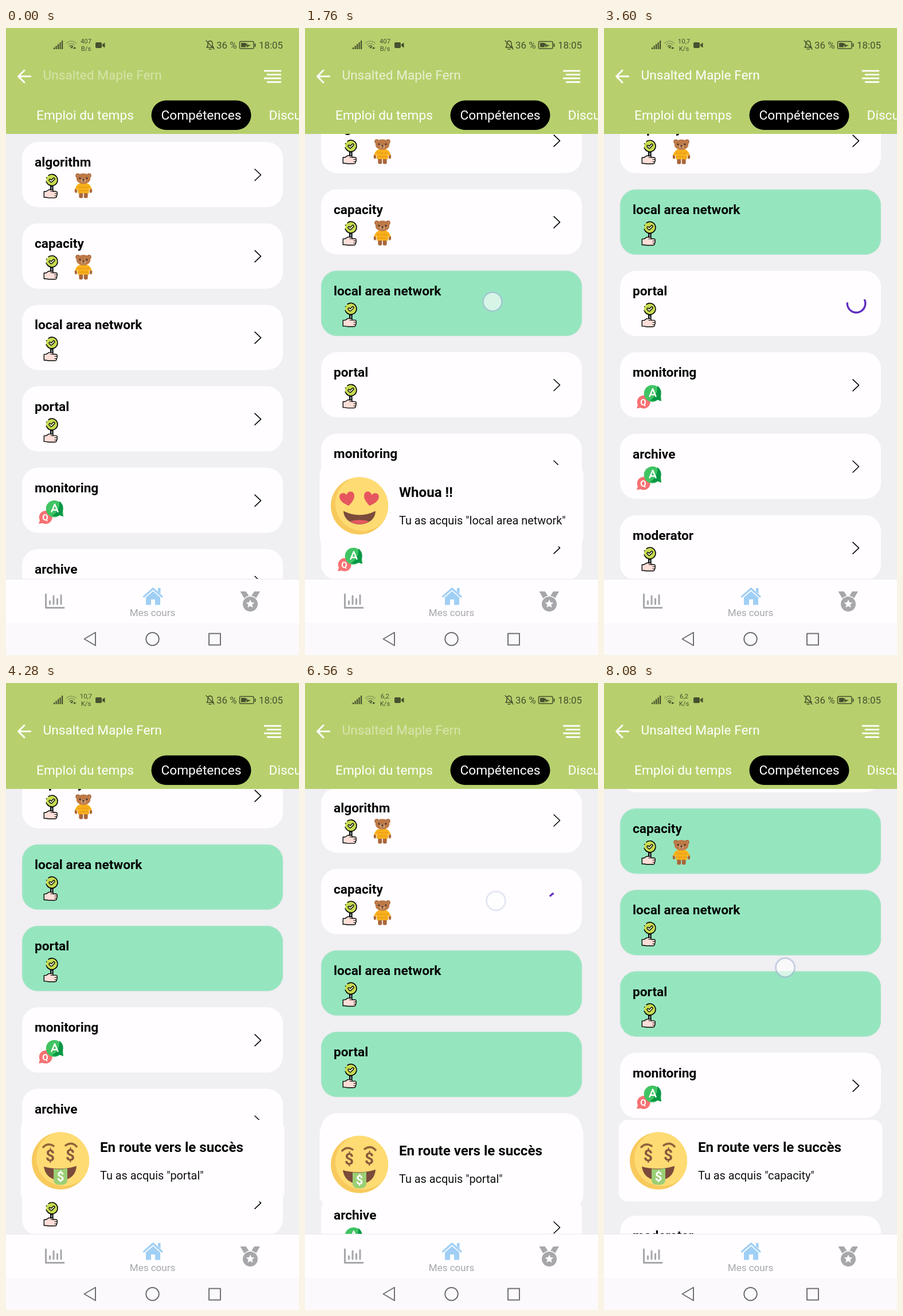
Write an HTML page with a canvas that moves like this. It is 511 px wide and 1095 px high and loops after 8120 ms.

```html
<!DOCTYPE html>
<html lang="fr">
<head>
<meta charset="utf-8">
<title>Compétences</title>
<style>
html, body { margin: 0; width: 100%; height: 100%; overflow: hidden; background: #f0eff2; }
canvas { display: block; }
</style>
</head>
<body>
<canvas id="stage" width="511" height="1095"></canvas>
<script>
const ctx = document.getElementById('stage').getContext('2d');
const LOOP = 8120, PITCH = 142.2, CARD_TOP = 199;
const WHITE = '#fffdff', LIME = '#b7d06d', GREY = '#a7a6ab', STATUS = '#46512f', INK = '#050505';

const cards = [
  { name: 'algorithm', icons: ['thumb', 'bear'] },
  { name: 'capacity', icons: ['thumb', 'bear'], tapped: 6530, done: 7280 },
  { name: 'local area network', icons: ['thumb'], tapped: 220, done: 480 },
  { name: 'portal', icons: ['thumb'], tapped: 3054, done: 3860 },
  { name: 'monitoring', icons: ['qa'] },
  { name: 'archive', icons: ['qa'] },
  { name: 'moderator', icons: ['thumb'] }
];
const toasts = [
  { name: 'local area network', title: 'Whoua !!', face: loveFace, show: 480, hide: 3040 },
  { name: 'portal', title: 'En route vers le succès', face: moneyFace, show: 3860, hide: 6519 },
  { name: 'capacity', title: 'En route vers le succès', face: moneyFace, show: 7280, hide: 9999 }
];
// Fingers marked "drag" follow the list; their y is the position at scroll 0.
const touches = [
  { down: 40, up: 180, x: 333, y: 541 },
  { down: 1500, up: 2220, x: 327, y: 537.5, drag: true },
  { down: 2750, up: 3020, x: 330, y: 485 },
  { down: 5030, up: 5900, x: 326, y: 682, drag: true },
  { down: 6190, up: 6500, x: 333, y: 380.5 },
  { down: 7540, up: 9999, x: 316, y: 619, drag: true }
];
const scrollKeys = [[0, 0], [1580, 0], [2080, 199.7], [2280, 201.5], [5080, 201.5],
  [5400, 218], [5500, 218], [5980, 16.5], [7600, 16.5], [8080, 122], [8120, 123]];

const clamp = v => Math.max(0, Math.min(1, v));
const smooth = p => p * p * (3 - 2 * p);

function scrollAt(t) {
  const i = Math.max(1, scrollKeys.findIndex(k => k[0] >= t));
  const [t0, a] = scrollKeys[i - 1], [t1, b] = scrollKeys[i];
  return a + (b - a) * smooth(clamp((t - t0) / (t1 - t0)));
}

function fill(color, d) { ctx.fillStyle = color; ctx.fill(new Path2D(d)); }
function stroke(color, width, d) {
  ctx.strokeStyle = color;
  ctx.lineWidth = width;
  ctx.stroke(new Path2D(d));
}
function rect(color, x, y, w, h, r = 0) {
  ctx.fillStyle = color;
  ctx.beginPath();
  ctx.roundRect(x, y, w, h, r);
  ctx.fill();
}
function oval(color, x, y, rx, ry = rx) {
  ctx.fillStyle = color;
  ctx.beginPath();
  ctx.ellipse(x, y, rx, ry, 0, 0, 7);
  ctx.fill();
}
function ring(color, width, x, y, r, from = 0, to = 2 * Math.PI) {
  ctx.strokeStyle = color;
  ctx.lineWidth = width;
  ctx.beginPath();
  ctx.arc(x, y, r, from, to);
  ctx.stroke();
}
function text(s, x, y, size, color, weight = 400, align = 'left') {
  ctx.font = `${weight} ${size}px Roboto, sans-serif`;
  ctx.textAlign = align;
  ctx.fillStyle = color;
  ctx.fillText(s, x, y);
}
function at(x, y, draw) {
  ctx.save();
  ctx.translate(x, y);
  draw();
  ctx.restore();
}

// Card icons, in coordinates of the card's top edge
const icons = {
  thumb() {
    rect(INK, 77, 76, 5.6, 8);
    rect('#8fa4ad', 78.8, 78, 2, 6);
    oval('#c6db50', 80, 66.5, 10);
    ring(INK, 1.6, 80, 66.5, 10, -2.2, 2.7);
    oval(INK, 70.2, 69.5, 0.9);
    oval(INK, 70.6, 62.5, 0.9);
    const check = 'M76.6 66.7 L78.9 68.9 L83.4 64.4';
    stroke(INK, 4.6, check);
    stroke('#e9f0bd', 1.9, check);
    const hand = 'M66.3 86.5 H70 L74.5 83.5 H80 Q83 83.5 82 86.3 H87.5 Q90 87 89 90 Q90 92 88.4 94 Q88.5 97.6 85 97.6 H74 L70 96.8 H66.3 Z';
    fill('#ffded8', hand);
    stroke(INK, 1.4, hand);
    stroke(INK, 1, 'M82 86.3 H78 M85 90 H89 M85 94 H88.4');
  },
  bear() {
    for (const side of [-1, 1]) {
      const x = 135 + side * 9.8;
      oval('#ad6c40', x, 58.7, 4);
      oval('#d08e5c', x, 59.2, 2);
      oval('#a9663a', 135 + side * 13, 85, 2.2, 4);
      rect('#a9663a', 135 + side * 4.2 - 3.4, 86, 6.8, 12, 2.5);
    }
    fill('#f8b01b', 'M129 72 H141 Q147 74 149.5 82 L146 84 L144.5 81 L145 89.5 H125 L125.5 81 L124 84 L120.5 82 Q123 74 129 72 Z');
    stroke('#e99a18', 1.5, 'M126 79 H144 M126 85 H144');
    oval('#bd7947', 135, 64, 12.2, 9.3);
    oval('#d8a273', 135, 67.7, 4.2, 3.5);
    oval('#3b2c2b', 135, 66, 1.9, 1.3);
    oval('#322a31', 129, 63.5, 1.4);
    oval('#322a31', 141, 63.5, 1.4);
    stroke('#694030', 0.8, 'M135 67 V69 M133 69.3 Q135 71 137 69.3');
  },
  qa() {
    fill('#f77173', 'M57 98 L59 92 A11.5 11.5 0 1 1 64 97 Z');
    text('Q', 68.5, 92.3, 15, '#fff', 700, 'center');
    fill('#40c463', 'M100 85 L95 82 A14.7 14.7 0 1 1 99 71 Z');
    fill('#079746', 'M93 58.5 Q103 66 98 79 L100 85.5 L93 83 Q88 86.5 80 84 Q94 77 93 58.5 Z');
    stroke('#fff', 2.4, 'M79.5 77 L85 64 L90.5 77 M81.5 74 H88.5');
  }
};

function spinner(age, y) {
  const p = age / 1332 % 1, span = 200;
  const turn = -152 + 306 * age / 1332 + Math.floor(age / 1332) * span;
  const from = turn + span * smooth(clamp(2 * p - 1));
  const to = turn + 30 + span * smooth(clamp(2 * p));
  ctx.lineCap = 'butt';
  ring('#612fc0', 3.4, 440, y, 15.8, from * Math.PI / 180, to * Math.PI / 180);
  ctx.lineCap = 'round';
}

function drawCard(card, t) {
  const done = t >= card.done;
  rect(done ? '#95e6bf' : WHITE, 28, 0, 455, 114, 28);
  if (done) {
    ctx.beginPath();
    ctx.roundRect(28.5, 0.5, 454, 113, 27.5);
    ctx.strokeStyle = '#a9e4c9';
    ctx.lineWidth = 1.2;
    ctx.stroke();
  }
  text(card.name, 50, 43, 22.7, INK, 700);
  card.icons.forEach(name => icons[name]());
  if (done) return;
  if (t >= card.tapped) spinner(t - card.tapped, 57);
  else stroke(INK, 1.6, 'M434 47.5 L444.5 57.5 L434 67.5');
}

function faceBase() {
  oval('#f8c95c', 0, 0, 50);
  ctx.save();
  ctx.beginPath();
  ctx.arc(0, 0, 50, 0, 7);
  ctx.clip();
  oval('#ffdb73', 6, -4, 48);
  ctx.restore();
}
function heart(x, y, angle) {
  at(x, y, () => {
    ctx.rotate(angle);
    fill('#e5565f', 'M0 12 C-7 7 -13 2 -13 -5 C-13 -13 -3 -14 0 -7 C3 -14 13 -13 13 -5 C13 2 7 7 0 12 Z');
  });
}
function loveFace() {
  faceBase();
  heart(-21, -12, -0.2);
  heart(20, -12, 0.2);
  fill('#7b4b3b', 'M-28 9 Q0 23 28 9 C27 40 -26 40 -28 9 Z');
  fill('#e65a61', 'M-17 27 Q0 22 17 27 Q9 32 0 32 Q-9 32 -17 27 Z');
}
function moneyFace() {
  faceBase();
  stroke('#93623c', 3.6, 'M-30 -24 Q-22 -32 -12 -26 M9 -27 Q20 -34 28 -25');
  text('$', -18, 0, 28, '#88593c', 700, 'center');
  text('$', 17, -1, 28, '#88593c', 700, 'center');
  fill('#7b4b3b', 'M-29 10 Q0 18 28 9 C27 25 16 34 0 34 C-16 34 -27 25 -29 10 Z');
  fill('#9bcf75', 'M-12 14 Q0 16 12 13 V33 Q12 42 0 42 Q-12 42 -12 33 Z');
  text('$', 0, 35, 22, '#fff', 700, 'center');
}

function drawToast(toast, t) {
  const away = t < toast.hide
    ? Math.pow(1 - clamp((t - toast.show) / 380), 3)
    : Math.pow((t - toast.hide) / 240, 2);
  if (t < toast.show || away >= 1) return;
  at(0, 763 + 205 * away, () => {
    rect(WHITE, 25.5, 0, 460, 142.5, 16);
    at(95, 71.5, toast.face);
    text(toast.title, 164, 56, 24.1, INK, 700);
    text(`Tu as acquis "${toast.name}"`, 164, 104, 19.87, '#111');
  });
}

function drawTouch(touch, t, scroll) {
  const alpha = Math.min(clamp((t - touch.down) / 40), 1 - clamp((t - touch.up) / 120));
  if (alpha <= 0) return;
  ctx.globalAlpha = alpha;
  at(touch.x, touch.y - (touch.drag ? scroll : 0), () => {
    ring('rgba(180,200,225,.25)', 4, 0, 0, 17);
    oval('rgba(255,255,255,.62)', 0, 0, 16);
    ring('rgba(130,150,190,.42)', 2, 0, 0, 16.2);
  });
  ctx.globalAlpha = 1;
}

function drawStatus(t) {
  for (let i = 0; i < 5; i++) rect(STATUS, 83 + i * 3.5, 34 - i * 3, 2.2, 3 + i * 3);
  [4, 8, 12].forEach(r => ring(r > 4 ? '#8b9d5a' : STATUS, 1.4, 114, 35, r, -2.35, -0.8));
  fill(STATUS, 'M112 34 l4 -2 v4 z M118 33 l5 2 -5 2 z');
  const [rate, unit] = t < 2960 ? ['407', 'B/s'] : t < 5960 ? ['10,7', 'K/s'] : ['6,2', 'K/s'];
  text(rate, 139.5, 27, 11.3, STATUS, 400, 'center');
  text(unit, 139.5, 40, 11.3, STATUS, 400, 'center');
  rect(STATUS, 156, 25, 11, 10, 2);
  fill(STATUS, 'M168 28.5 L172.5 25.5 V34.5 L168 31.5 Z');
  stroke(STATUS, 1.5, 'M350 34 H362 L360 31 V27 Q360 23 356 22.5 Q352 23 352 27 V31 Z M354 37 H358 M349 22 L363 37');
  text('36 %', 367, 36, 16.9, STATUS);
  stroke(STATUS, 1.5, 'M409 23.5 H430 Q432 23.5 432 25.5 V34 Q432 36 430 36 H409 Q407.5 36 407.5 34 V25.5 Q407.5 23.5 409 23.5 Z');
  rect(STATUS, 410, 26, 8, 7.5);
  fill(STATUS, 'M413 29.5 L421 26.5 L420 29 L427 30 L419 34 L420 31 Z');
  rect(STATUS, 433.5, 27, 2, 6);
  text('18:05', 441, 36, 16.9, STATUS);
}

function drawHeader(t, scroll) {
  rect(LIME, 0, 0, 511, 185);
  drawStatus(t);
  stroke('#fff', 3, 'M42.5 84.5 H22 M32 74 L21.5 84.5 L32 95');
  ctx.globalAlpha = 0.42 + 0.58 * clamp((scroll - 10) / 105);
  text('Unsalted Maple Fern', 64.5, 90, 22.7, '#fff');
  ctx.globalAlpha = 1;
  for (let i = 0; i < 4; i++) {
    const x = i % 2 ? 455 : 450;
    rect('#fff', x, 73.5 + i * 6.5, 480 - x, 2.8);
  }
  text('Emploi du temps', 53, 160, 22.7, '#fff');
  rect('#000', 253.5, 126.5, 174, 51.5, 26);
  text('Compétences', 340.5, 160, 22.7, '#fff', 400, 'center');
  text('Discussion', 458.5, 160, 22.7, '#fff');
}

function drawNav() {
  rect(WHITE, 0, 962.5, 511, 77);
  rect('#e9e8eb', 0, 962, 511, 1);
  rect('#fbf9fc', 0, 1039, 511, 56);
  stroke(GREY, 3, 'M69.5 989 V1012.5 H101');
  stroke(GREY, 3, 'M76.5 1001 V1006 M83 992 V1006 M89.5 997 V1006 M96 990.5 V1006');
  const blue = '#a0cff5';
  stroke(blue, 3.2, 'M240.5 993 L256.5 979 L272 993');
  fill(blue, 'M244 994.5 L256.5 983.5 L269 994.5 V1007.5 H260 V998 H253 V1007.5 H244 Z M265 978 H269.5 V988 L265 984 Z');
  text('Mes cours', 255.5, 1026.5, 17.03, GREY, 400, 'center');
  fill(GREY, 'M408.5 984 H418.5 L425 994 L416 997 Z M443 984 H433 L426.5 994 L435.5 997 Z');
  oval(WHITE, 426, 1006, 14.5);
  oval(GREY, 426, 1006, 13);
  let star = '';
  for (let i = 0; i < 10; i++) {
    const a = i * Math.PI / 5, r = i % 2 ? 3.6 : 7.8;
    star += `${i ? 'L' : 'M'}${426 + r * Math.sin(a)} ${1006 - r * Math.cos(a)}`;
  }
  fill(WHITE, star + 'Z');
  const key = '#707074';
  stroke(key, 2, 'M156 1055.5 V1078.5 L136.5 1067 Z');
  ring(key, 2, 255.5, 1067, 11.3);
  stroke(key, 2, 'M354 1057.5 H374 V1077.5 H354 Z');
}

function draw(t) {
  const scroll = scrollAt(t);
  rect('#f0eff2', 0, 0, 511, 1095);
  cards.forEach((card, i) => at(0, CARD_TOP + i * PITCH - scroll, () => drawCard(card, t)));
  toasts.forEach(toast => drawToast(toast, t));
  drawHeader(t, scroll);
  drawNav();
  touches.forEach(touch => drawTouch(touch, t, scroll));
}

ctx.lineCap = ctx.lineJoin = 'round';
const start = performance.now();
function tick() {
  draw((performance.now() - start) % LOOP);
  requestAnimationFrame(tick);
}
tick();
</script>
</body>
</html>
```
